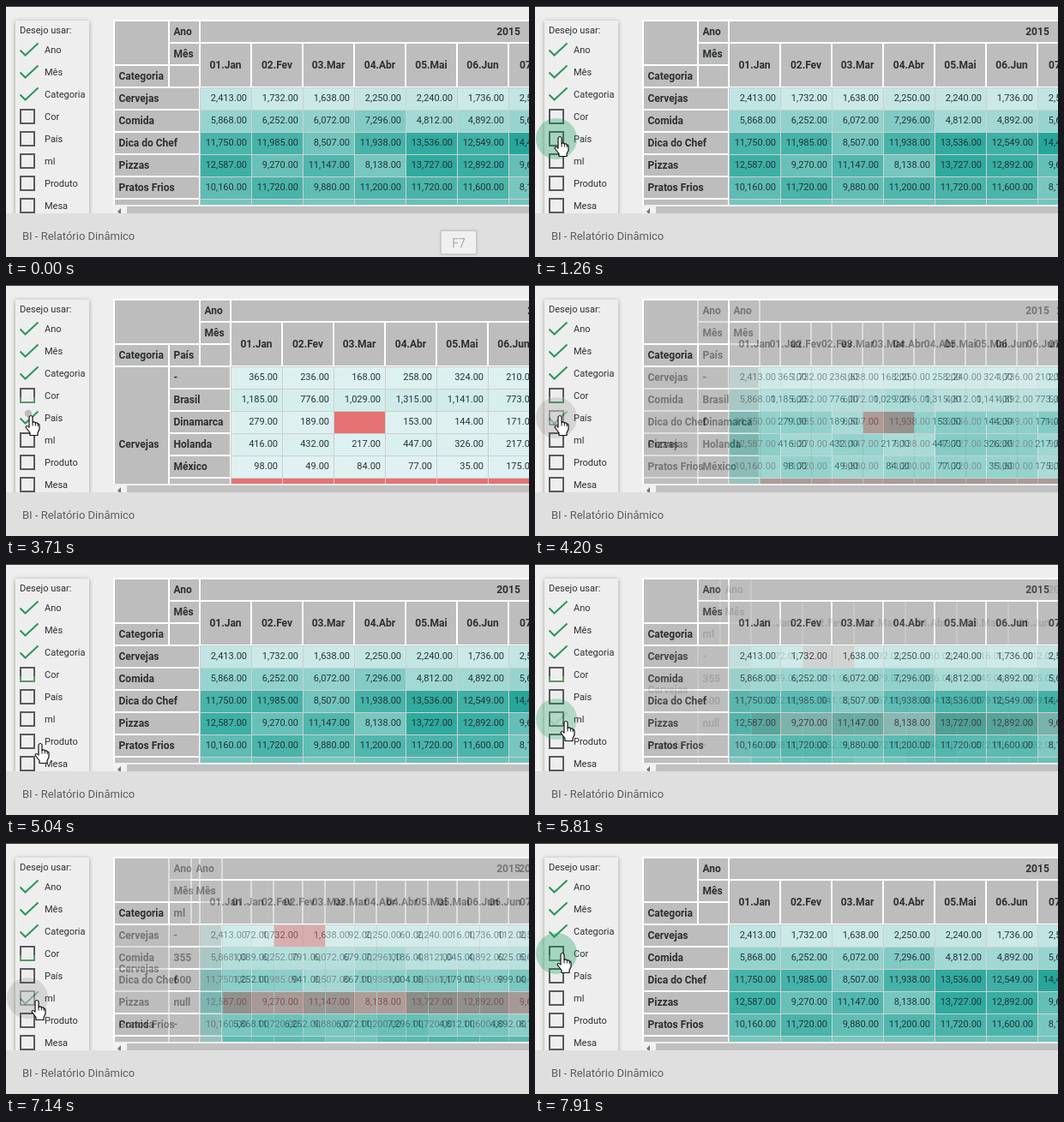
Recreate the animation shown at these times as an HTML page with a canvas. Size 610 by 293 pixels, loop 8 s.

```html
<!DOCTYPE html>
<html lang="pt">
<head>
<meta charset="utf-8">
<title>BI - Relatório Dinâmico</title>
<style>
  html, body { margin: 0; width: 100%; height: 100%; overflow: hidden; background: #eee; }
  canvas { display: block; }
</style>
</head>
<body>
<canvas id="stage" width="610" height="293"></canvas>
<script>
const W = 610, H = 293, LOOP = 8000;
const stage = document.getElementById('stage').getContext('2d');
const FONT = 'Roboto, Arial, sans-serif';
const MONTHS = ['01.Jan', '02.Fev', '03.Mar', '04.Abr', '05.Mai', '06.Jun', '07.Jul'];
const FIELDS = ['Ano', 'Mês', 'Categoria', 'Cor', 'País', 'ml', 'Produto', 'Mesa'];
const TOP = 17, ROW = 26, COL = 60, LEFT = 126, SPLIT = 190, BOTTOM = 232;
const none = Array(7).fill(null);
const comida = [5868, 6252, 6072, 7296, 4812, 4892, 5640];
const dica = [11750, 11985, 8507, 11938, 13536, 12549, 14412];

// A row is [label, values]; span is how many rows the first group covers.
const byCategory = {
  left: 226,
  rows: [
    ['Cervejas', [2413, 1732, 1638, 2250, 2240, 1736, 2512]],
    ['Comida', comida],
    ['Dica do Chef', dica],
    ['Pizzas', [12587, 9270, 11147, 8138, 13727, 12892, 9640]],
    ['Pratos Frios', [10160, 11720, 9880, 11200, 11720, 11600, 8120]],
    ['Sobremesas', [8300, 8650, 8100, 8700, 9400, 8900, 8500]]
  ]
};
const byCountry = {
  left: 262, field: 'País', mid: 226, span: 7,
  rows: [
    ['-', [365, 236, 168, 258, 324, 210]],
    ['Brasil', [1185, 776, 1029, 1315, 1141, 773]],
    ['Dinamarca', [279, 189, null, 153, 144, 171]],
    ['Holanda', [416, 432, 217, 447, 326, 217]],
    ['México', [98, 49, 84, 77, 35, 175]],
    ['null', none]
  ]
};
const bySize = {
  left: 252, field: 'ml', mid: 216, span: 4,
  rows: [
    ['-', [72, null, 92, 60, 16, 112]],
    ['355', [1089, 791, 679, 1186, 1045, 625]],
    ['600', [1252, 941, 867, 1004, 1179, 999]],
    ['null', none],
    ['-', comida, 'Comida'],
    ['-', dica, 'Dica do Chef']
  ]
};

const clamp = v => Math.max(0, Math.min(1, v));
const mix = (a, b, k) => a + (b - a) * k;
const ease = k => k * k * (3 - 2 * k);

function text(c, s, x, y, { size = 11, bold = false, align = 'left', color = '#2b2f31' } = {}) {
  c.font = `${bold ? 'bold ' : ''}${size}px ${FONT}`;
  c.textAlign = align;
  c.fillStyle = color;
  c.fillText(s, x, y);
}

function box(c, color, x0, y0, x1, y1) {
  c.fillStyle = color;
  c.fillRect(x0, y0, x1 - x0, y1 - y0);
}

// Grey heading cell with its label vertically centred.
function head(c, s, x0, y0, x1, y1, centered) {
  box(c, '#bdbdbd', x0 + 1, y0 + 1, x1 - 1, y1 - 1);
  const x = centered ? (x0 + x1) / 2 : x0 + 5.5;
  text(c, s, x, (y0 + y1) / 2 + 4, { size: 12, bold: true, align: centered ? 'center' : 'left' });
}

function shade(v) {
  if (v === null) return '#e57373';
  const k = clamp(v / 14400);
  return `rgb(${mix(224, 38, k)}, ${mix(242, 166, k)}, ${mix(241, 154, k)})`;
}

const money = v => v.toLocaleString('en-US', { minimumFractionDigits: 2 });

function drawTable(c, { left, field, mid, span, rows }) {
  const y = i => TOP + i * ROW;
  const corner = field ? mid : SPLIT;
  c.save();
  c.beginPath();
  c.rect(LEFT - 1, TOP - 1, W, BOTTOM - TOP + 1);
  c.clip();
  box(c, '#fff', LEFT - 1, TOP - 1, W, BOTTOM);
  head(c, '', LEFT, y(0), corner, y(2));
  head(c, 'Ano', corner, y(0), left, y(1));
  head(c, 'Mês', corner, y(1), left, y(2));
  head(c, 'Categoria', LEFT, y(2), SPLIT, y(3));
  if (field) head(c, field, SPLIT, y(2), mid, y(3));
  head(c, '', corner, y(2), left, y(3));
  head(c, '2015', left, y(0), left + 12 * COL, y(1), true);
  MONTHS.forEach((m, i) => head(c, m, left + i * COL, y(1), left + (i + 1) * COL, y(3), true));
  if (field) head(c, 'Cervejas', LEFT, y(3), SPLIT, y(3 + span));

  rows.forEach(([label, values, group], r) => {
    const y0 = y(r + 3), y1 = y0 + ROW;
    if (group) head(c, group, LEFT, y0, SPLIT, y1);
    head(c, label, field ? SPLIT : LEFT, y0, left, y1);
    values.forEach((v, i) => {
      const x = left + i * COL;
      box(c, '#cdd0d0', x, y0, x + COL + 1, y1 + 1);
      box(c, shade(v), x + 1, y0 + 1, x + COL, y1);
      if (v !== null) text(c, money(v), x + 55, y0 + 16, { align: 'right', color: '#263238' });
    });
  });
  c.restore();
}

function drawScrollbar(c) {
  box(c, '#f1f1f1', LEFT - 1, BOTTOM + 1, W, 242);
  box(c, '#c1c1c1', 141, BOTTOM + 2, W, 242);
  c.fillStyle = '#777';
  c.beginPath();
  c.moveTo(130, 240);
  c.lineTo(134, 236);
  c.lineTo(134, 244);
  c.fill();
}

function drawField(c, name, y, on, tinted) {
  c.lineWidth = 2;
  if (on) {
    c.strokeStyle = '#2b965a';
    c.beginPath();
    c.moveTo(16.5, y + 0.5);
    c.lineTo(22.5, y + 6.5);
    c.lineTo(37.5, y - 7.5);
    c.stroke();
  } else {
    c.strokeStyle = '#5a5a5a';
    c.strokeRect(17, y - 8, 16, 16);
    if (tinted) {
      c.strokeStyle = '#579a68';
      c.beginPath();
      c.moveTo(17, y + 2);
      c.lineTo(17, y + 8);
      c.lineTo(33, y + 8);
      c.lineTo(33, y + 2);
      c.stroke();
    }
  }
  text(c, name, 45, y + 4);
}

function drawPage(c, table, tinted) {
  box(c, '#eee', 0, 0, W, H);
  box(c, '#3c3c3c', 0, 0, W, 1);
  c.save();
  c.shadowColor = 'rgba(0,0,0,.35)';
  c.shadowBlur = 5;
  c.shadowOffsetY = 1;
  box(c, '#eee', 11, 17, 97, 260);
  c.restore();
  text(c, 'Desejo usar:', 16, 32);
  FIELDS.forEach((f, i) =>
    drawField(c, f, 51 + i * 26, i < 3 || f === table.field, tinted && f === 'Cor'));
  drawTable(c, table);
  drawScrollbar(c);
  box(c, '#dfdfdf', 0, 242, W, H);
  text(c, 'BI - Relatório Dinâmico', 19, 273, { size: 13, color: '#5c5c5c' });
}

function page(table, tinted) {
  const cv = document.createElement('canvas');
  cv.width = W;
  cv.height = H;
  drawPage(cv.getContext('2d'), table, tinted);
  return cv;
}

const plain = page(byCategory, true);
const first = page(byCategory, false);
const FADE = 420;
const scenes = [
  { at: -FADE, view: first },
  { at: 1470, view: page(byCountry, true) },
  { at: 3990, view: plain },
  { at: 5740, view: page(bySize, true) },
  { at: 6930, view: plain }
];

const GREEN = '15,157,88', GREY = '80,80,80';
const ripples = [
  { at: 1190, end: 1470, y: 155, rgb: GREEN },
  { at: 3710, end: 3990, y: 155, rgb: GREY },
  { at: 5460, end: 5740, y: 181, rgb: GREEN },
  { at: 6650, end: 6930, y: 181, rgb: GREY },
  { at: 7840, end: LOOP, y: 129, rgb: GREEN }
];

// Pointer legs: start, end, then the position reached.
const legs = [
  [70, 770, 36, 137],
  [840, 1050, 29, 152],
  [4200, 4830, 41, 214],
  [4830, 5040, 40, 209],
  [5040, 5320, 36, 183],
  [7200, 7770, 32, 128]
];

function pointerAt(t) {
  let x = 618, y = 240;
  for (const [a, b, px, py] of legs) {
    const k = ease(clamp((t - a) / (b - a)));
    x = mix(x, px, k);
    y = mix(y, py, k);
  }
  return [x, y];
}

const hand = new Path2D('M-2 1.5Q0-1.5 2 1.5V8Q4.3 6.4 5.3 8.6Q7.4 7.6 8.2 9.8Q10 9.2 10 11.5V16L8 20V23H-1V20L-6 13.5Q-5.5 10.5-2 13.5Z');
const knuckles = new Path2D('M2 8V12M5.3 8.6V12M8.2 9.8V12.5');

function drawPointer(x, y) {
  stage.save();
  stage.translate(Math.round(x), Math.round(y) + 0.5);
  stage.fillStyle = '#fff';
  stage.strokeStyle = '#111';
  stage.lineJoin = 'round';
  stage.lineWidth = 1.2;
  stage.fill(hand);
  stage.stroke(hand);
  stage.lineWidth = 1;
  stage.stroke(knuckles);
  stage.restore();
}

function drawRipple({ at, end, y, rgb }, t) {
  if (t < at) return;
  const k = clamp((t - at) / 65);
  const alpha = 0.32 * (1 - clamp((t - end) / FADE));
  if (alpha <= 0) return;
  stage.fillStyle = `rgba(${rgb},${alpha})`;
  stage.beginPath();
  stage.arc(mix(26, 25, k), mix(y - 5, y, k), mix(4, 24, k), 0, 7);
  stage.fill();
}

function drawKey(alpha) {
  stage.save();
  stage.globalAlpha = alpha;
  stage.shadowColor = 'rgba(0,0,0,.2)';
  stage.shadowBlur = 3;
  box(stage, '#c8c8c8', 507, 262, 549, 290);
  stage.shadowColor = 'transparent';
  box(stage, '#f0f0f0', 508, 263, 548, 289);
  text(stage, 'F7', 528, 282, { size: 14, align: 'center', color: '#a9a9a9' });
  stage.restore();
}

function draw(t) {
  scenes.forEach(({ at, view }) => {
    const k = clamp((t - at) / FADE);
    if (!k) return;
    stage.globalAlpha = k;
    stage.drawImage(view, 0, 0);
  });
  stage.globalAlpha = 1;
  ripples.forEach(r => drawRipple(r, t));
  const key = 1 - clamp((t - 60) / 200);
  if (key) drawKey(key);
  drawPointer(...pointerAt(t));
}

function tick() {
  draw(performance.now() % LOOP);
  requestAnimationFrame(tick);
}
tick();
</script>
</body>
</html>
```
